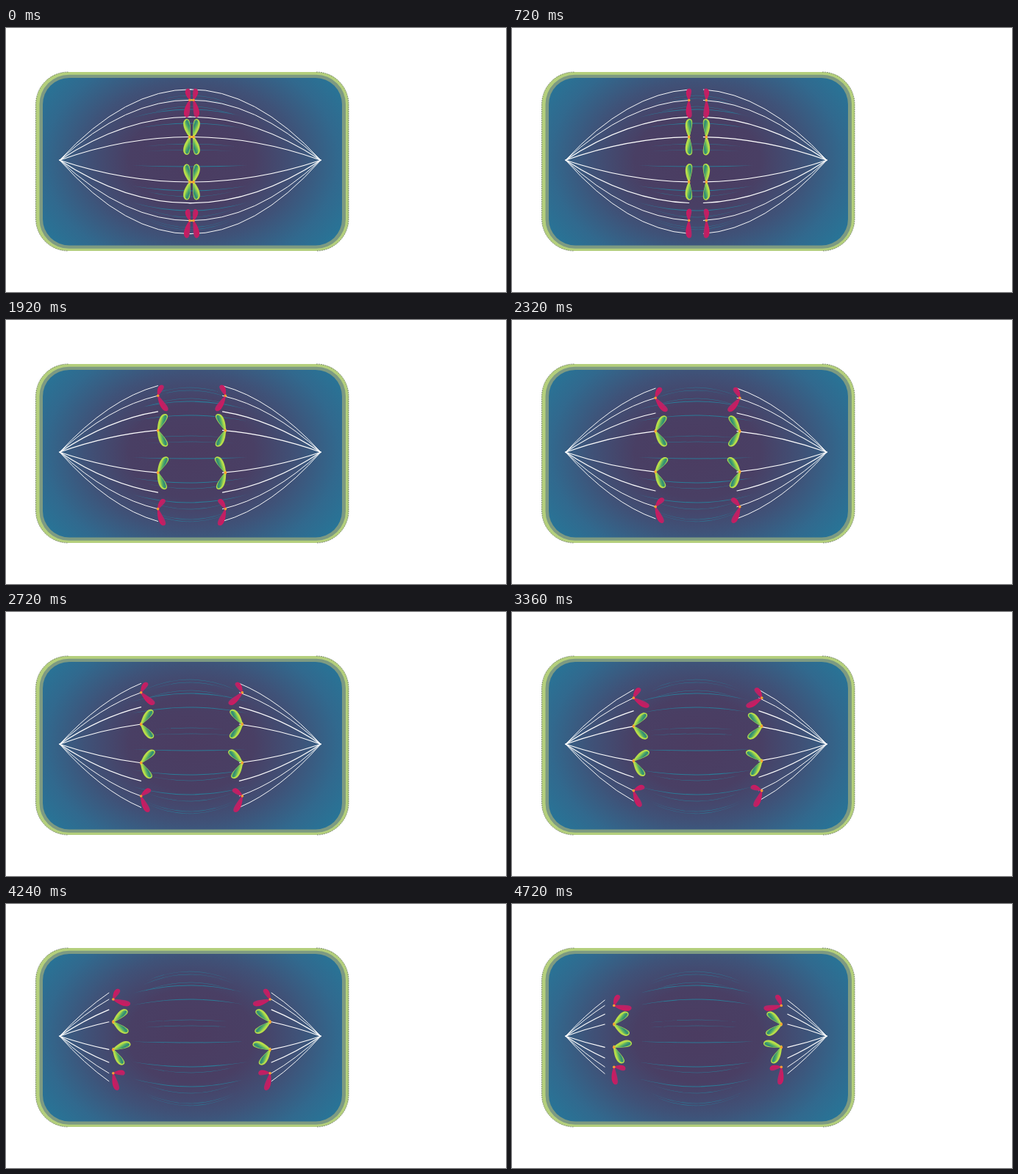
These frames come from a looping animation (680 by 360 pixels, 4.8 s). An HTML page:

```html
<!DOCTYPE html>
<html lang="en">
<head>
<meta charset="utf-8">
<title>Anaphase</title>
<style>
html, body { margin: 0; width: 100%; height: 100%; overflow: hidden; background: #fff; }
svg { display: block; }
</style>
</head>
<body>
<svg width="680" height="360" viewBox="0 0 680 360">
  <defs>
    <radialGradient id="plasm" gradientUnits="userSpaceOnUse" cx="0" cy="0" r="250"
      gradientTransform="translate(252 180) scale(1 .75)">
      <stop offset="0" stop-color="#4b3c61"/>
      <stop offset=".34" stop-color="#493f64"/>
      <stop offset=".58" stop-color="#3f5278"/>
      <stop offset=".8" stop-color="#31698e"/>
      <stop offset="1" stop-color="#267799"/>
    </radialGradient>
    <linearGradient id="leaf" gradientUnits="userSpaceOnUse" x1="-5" y1="-14" x2="4" y2="-17">
      <stop offset="0" stop-color="#a5d64c"/>
      <stop offset=".4" stop-color="#55ad66"/>
      <stop offset=".85" stop-color="#2c8578"/>
      <stop offset="1" stop-color="#4fa568"/>
    </linearGradient>
    <linearGradient id="rose" gradientUnits="userSpaceOnUse" x1="-5" y1="0" x2="4" y2="0">
      <stop offset="0" stop-color="#d1185f"/>
      <stop offset="1" stop-color="#b02768"/>
    </linearGradient>
  </defs>
  <rect x="40.5" y="60" width="425.5" height="244" rx="44" fill="#b4cf7c"/>
  <path d="M84.5 60A44 44 0 0 0 40.5 104V260A44 44 0 0 0 84.5 304M422 60A44 44 0 0 1 466 104V260A44 44 0 0 1 422 304"
    fill="none" stroke="#2b3a2c" stroke-width=".5" stroke-dasharray="2 1"/>
  <rect x="45.5" y="63.7" width="416.5" height="237" rx="40" fill="#7d9a82"/>
  <rect x="50" y="68" width="407" height="228.5" rx="36" fill="url(#plasm)"/>
  <g id="wisps" fill="#2b7b98"></g>
  <g id="threads" fill="none" stroke="#fff" stroke-linecap="round"></g>
  <g id="bodies"></g>
</svg>
<script>
const NS = 'http://www.w3.org/2000/svg';
const $ = id => document.getElementById(id);

function add(parent, tag, attrs = {}) {
  const el = document.createElementNS(NS, tag);
  for (const k in attrs) el.setAttribute(k, attrs[k]);
  return parent.appendChild(el);
}

const SIDES = [1, -1];
const POLE = { left: 73, right: 428, y: 180.2 };
const SPAN = POLE.right - POLE.left;
const MID = 252;
const LAST = 56;

// Faint crescents that bow away from the cell's axis
function wisp(peak, half, w) {
  const end = peak + (POLE.y - peak) * .16;
  const c = 2 * peak - end;
  add($('wisps'), 'path', {
    d: `M${250 - half} ${end}Q250 ${c - w} ${250 + half} ${end}Q250 ${c + w} ${250 - half} ${end}`
  });
}
[111, 130, 189, 222, 249].forEach(y => wisp(y, 78, 1.1));
[92, 96, 107, 158, 166, 230, 258, 272, 275].forEach(y => wisp(y, 62, .5));

// Threads are parabolas between the poles, cut back from the middle.
const gapAt = n => 2.3 * n * n / (n + 1.3);
const along = gap => (MID - gap - POLE.left) / SPAN;
const threadY = (h, u) => POLE.y - 4 * h * u * (1 - u);

const threads = [96.5, 82, 59, 31.7, -29.8, -58.5, -82.5, -100.5].flatMap(h =>
  SIDES.map(side => ({
    h, side,
    el: add($('threads'), 'path', { 'stroke-width': Math.abs(h) < 60 ? 1.15 : .95 })
  })));

function drawThread({ h, side, el }, n) {
  const u = along(gapAt(n));
  const start = side > 0 ? POLE.left : POLE.right;
  const x = v => start + side * v * SPAN;
  el.setAttribute('d',
    `M${start} ${POLE.y}Q${x(u / 2)} ${POLE.y - 2 * h * u} ${x(u)} ${threadY(h, u)}`);
}

// Each chromatid rides the cut end of its thread; twist is its final turn.
const kinds = [
  { h: 82, pink: true, twist: 28 },
  { h: 31.7, pink: false, twist: 3 },
  { h: -29.8, pink: false, twist: -23 },
  { h: -82.5, pink: true, twist: -47 }
];

const PETAL = 'M-.8 0C-3.2 -5 -6.2 -13 -5 -19C-4 -25.6 3 -27 4 -21.5C4.8 -17 2.6 -8 .8 0Z';

function arm(parent, pink, upper) {
  const g = add(parent, 'g');
  if (pink) {
    add(g, 'path', {
      d: PETAL, fill: 'url(#rose)', transform: upper ? 'scale(.76 .64)' : 'scale(.85 .97)'
    });
  } else {
    add(g, 'path', { d: PETAL, fill: '#b9de4a' });
    add(g, 'path', { d: PETAL, fill: 'url(#leaf)', transform: 'translate(.6 -2) scale(.68 .86)' });
  }
  return g;
}

const bodies = kinds.flatMap(kind => SIDES.map(side => {
  const g = add($('bodies'), 'g');
  const up = arm(g, kind.pink, true), down = arm(g, kind.pink, false);
  if (!kind.pink) add(g, 'ellipse', { rx: 1.3, ry: 2.8, fill: '#e6e13c' });
  add(g, 'circle', { r: 1.8, fill: '#f79d33' });
  return { ...kind, side, g, up, down };
}));

const links = kinds.map(({ h, pink }) =>
  add($('bodies'), 'circle', { cx: MID + .5, cy: POLE.y - h, r: pink ? 1.2 : 1.6, fill: '#f6c832' }));

function drawBody({ h, twist, side, g, up, down }, n) {
  const p = n / LAST;
  const gap = gapAt(n);
  const lag = 12.5 * Math.max(0, (p - .8) / .2);
  const x = MID + .5 - side * (Math.max(2.5, gap + .4) - lag);
  const open = 52 - 64 * (1 - p) ** 2;
  const tilt = twist * p * p;
  g.setAttribute('transform', `translate(${x} ${threadY(h, along(gap))}) scale(${side} 1)`);
  up.setAttribute('transform', `rotate(${open - tilt})`);
  down.setAttribute('transform', `scale(1 -1) rotate(${open + tilt})`);
}

const LOOP = 4800, STEP = 80, HOLD = 320;
const t0 = performance.now();
let shown = -1;

function tick() {
  const t = Math.max(0, performance.now() - t0) % LOOP;
  const n = t < HOLD ? 0 : Math.min(LAST, Math.floor((t - HOLD) / STEP) + 1);
  if (n !== shown) {
    shown = n;
    threads.forEach(o => drawThread(o, n));
    bodies.forEach(o => drawBody(o, n));
    links.forEach(el => el.setAttribute('visibility', n ? 'hidden' : 'visible'));
  }
  requestAnimationFrame(tick);
}
tick();
</script>
</body>
</html>
```
